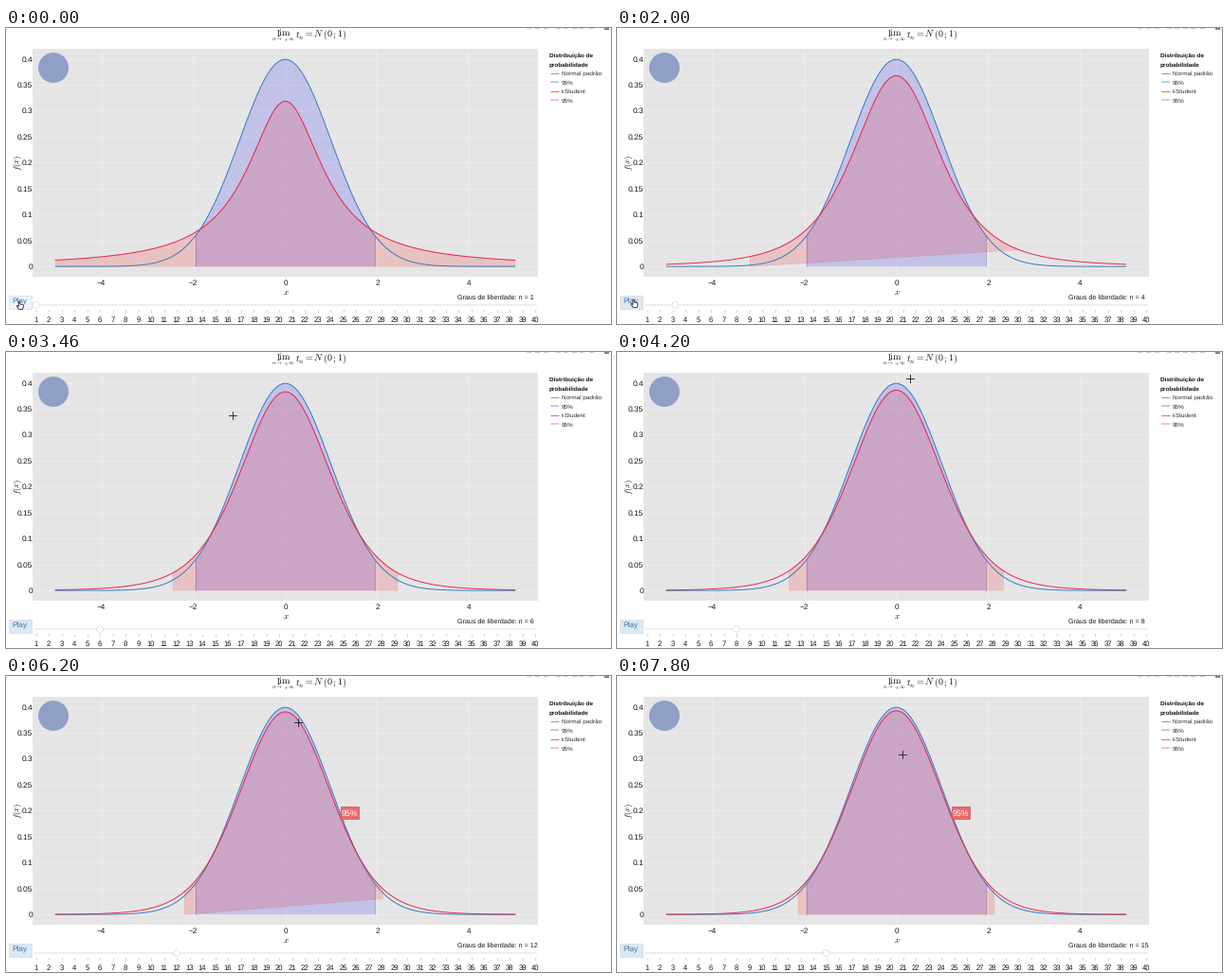
A matplotlib script that plays this animation: 638 px wide and 313 px high, repeating every 7860 ms.

```python
import math

import matplotlib.pyplot as plt
import numpy as np
from matplotlib.animation import FuncAnimation
from matplotlib.patches import Circle, Polygon, Rectangle

W, H, DPI = 638, 313, 100
LOOP, STEP_MS = 7860, 60
X0, Y0, SX, SY = 294.5, 252.2, 48.45, 549.0   # data origin and scale in pixels
FIRST, PERIOD = 432, 501                      # first animation step and its spacing
CURVE_MS, KNOB_MS = 500, 120
N_MAX = 15
BLUE, RED = "#3078bc", "#e6234f"
INK = "#111111"

plt.rcParams.update({"font.family": ["Liberation Sans", "DejaVu Sans"],
                     "mathtext.fontset": "cm", "text.hinting": "none"})


def px(x):
    return X0 + SX * np.asarray(x, float)


def py(y):
    return Y0 - SY * np.asarray(y, float)


def normal(x):
    return np.exp(-x * x / 2) / math.sqrt(2 * math.pi)


def student(x, n):
    c = math.gamma((n + 1) / 2) / (math.sqrt(n * math.pi) * math.gamma(n / 2))
    return c * (1 + x * x / n) ** (-(n + 1) / 2)


def bound(n):
    """Half width of the central 95 % area, limited to the drawn range."""
    x = np.linspace(0, 5, 10001)
    p = student(x, n)
    cdf = np.concatenate([[0], np.cumsum((p[1:] + p[:-1]) / 2) * (x[1] - x[0])])
    return float(np.interp(0.475, cdf, x))


def ease(p):
    p = min(max(p, 0), 1)
    return 4 * p ** 3 if p < 0.5 else 1 - 4 * (1 - p) ** 3


def mix(a, b, e):
    return a + (b - a) * e


fig = plt.figure(figsize=(W / DPI, H / DPI), dpi=DPI, facecolor="white")
ax = fig.add_axes([0, 0, 1, 1])
ax.set_xlim(0, W)
ax.set_ylim(H, 0)
ax.axis("off")


def pt(size):
    return size * 72 / DPI


def text(x, y, s, size, ha="center", color=INK, **kw):
    kw.setdefault("va", "center_baseline")
    return ax.text(x, y, s, fontsize=pt(size), ha=ha, color=color, **kw)


def line(xs, ys, color, width=1.0, **kw):
    return ax.plot(xs, ys, color=color, lw=pt(width), **kw)[0]


def box(x0, y0, x1, y1, face, edge="none", **kw):
    return ax.add_patch(Rectangle((x0, y0), x1 - x0, y1 - y0, fc=face, ec=edge,
                                  lw=pt(0.8), **kw))


# Plot panel, grid and axis labels
box(28, 22, 561, 263, "#e5e5e5", zorder=0)
for v in range(-4, 5, 2):
    line([px(v)] * 2, [22, 263], "#ececec", 1, zorder=1)
    text(px(v), 269, f"{v}".replace("-", "\u2212"), 8.1)
for k in range(9):
    v = k * 0.05
    line([28, 561], [py(v)] * 2, "#ececec", 1, zorder=1)
    text(28, py(v), f"{v:.2f}".rstrip("0").rstrip(".") if k else "0", 8.4, "right")
text(12.5, 142, "$f(x)$", 8.8, rotation=90, va="center")
text(295, 279.5, "$x$", 9)

# Title
text(292.5, 9, r"$\lim$", 10.2, va="baseline")
text(292.5, 13.6, r"$n\to+\infty$", 5.8, va="baseline")
text(305, 9, r"$t_n = N\,(0\,;1)$", 10, "left", va="baseline")

# Cropped toolbar and corner emblem
for x in (551, 560, 569, 582, 590, 599, 607, 617):
    line([x - 2, x + 2], [0.4, 0.4], "#ced2da", 1.2)
box(631, 0, 636, 1.5, "#7385ad")
ax.add_patch(Circle((50, 42), 16, fc="#8f9fc6", ec="none", zorder=2))

# Legend
text(573, 28.8, "Distribuição de", 6.4, "left", weight="bold")
text(573, 38.6, "probabilidade", 6.4, "left", weight="bold")
for k, (name, color) in enumerate([("Normal padrão", "#5b9bcb"), ("95%", "#c6c6f4"),
                                   ("t-Student", "#ea5576"), ("95%", "#f6c4c8")]):
    y = 47.8 + 9.55 * k
    line([573.5, 582.5], [y, y], color, 2 if k % 2 else 0.9, solid_capstyle="butt")
    text(585.5, y, name, 6.35, "left", color="#2a2a2a")

# Curves and areas
xs = np.linspace(-5, 5, 401)
inner = np.linspace(-1.96, 1.96, 161)
ax.fill(px(np.r_[-1.96, inner, 1.96]), py(np.r_[0, normal(inner), 0]),
        fc=(0, 0, 1, 0.15), ec="none", zorder=2)
for v in (-1.96, 1.96):
    line([px(v)] * 2, [py(0), py(normal(v))], "#5a5ac8", 0.8, alpha=0.4, zorder=3)
t_area = ax.add_patch(Polygon([[0, 0]], closed=True, fc=(1, 0, 0, 0.15),
                              ec=(0.9, 0.2, 0.2, 0.18), lw=pt(0.7), zorder=3))
line(px(xs), py(normal(xs)), BLUE, 0.95, zorder=4)
t_line = line(px(xs), py(student(xs, 1)), RED, 0.95, zorder=5)


# Slider
def tick_x(n):
    return 31.5 + 13.51 * (n - 1)


line([31, 559], [293, 293], "#ebeef3", 2)
for n in range(1, 41):
    line([tick_x(n)] * 2, [297.5, 300], "#b9c0ca", 0.7)
    text(tick_x(n), 308, str(n), 7.6)
knob = ax.add_patch(Circle((31.5, 293), 3.4, fc="white", ec="#dde2e9",
                           lw=pt(0.9), zorder=6))
caption = text(476, 284.3, "", 7.15, "left")

button = box(3, 282.5, 26.5, 296.5, "#eef3fa", "#d3dfea")
text(14.5, 288.6, "Play", 8.3, color="#3a78ac")

# Hover labels
tip = [
    ax.add_patch(Polygon([(306.1, 39.2), (309, 36.5), (309, 33), (381.5, 33),
                          (381.5, 45.5), (309, 45.5), (309, 42)],
                         fc="#1f77b4", ec="#e5e5e5", lw=pt(0.6), zorder=8)),
    text(345.3, 39.2, "(0.24, 0.3876166)", 9.5, color="white", zorder=9),
    text(384, 39.2, "Normal padrão", 9.1, "left", color=BLUE, zorder=9),
]
badge = [
    box(353, 137.5, 372, 151, "#ee6868", "#c66060", zorder=8),
    text(362.5, 144.6, "95%", 8.8, color="white", zorder=9),
]

# Pointers
cross = [line([], [], "#222222", 0.9, zorder=10) for _ in range(2)]
HAND = np.array([(0, 0), (1.2, 0), (1.4, 3), (4.6, 3.8), (5, 5), (4, 8.5),
                 (0.2, 8.5), (-2.2, 5), (-1.4, 4.4), (0, 5.5)])
hand = ax.add_patch(Polygon(HAND, fc="white", ec="#222222", lw=pt(0.8), zorder=10))
PATH = np.array([(0, 13.5, 289), (400, 13.5, 289), (2000, 17, 287), (2130, 18, 287),
                 (2690, 178.5, 101), (2740, 178.5, 101), (4200, 309, 28),
                 (4400, 309, 33), (5900, 309, 46), (6950, 305, 56), (7800, 301, 83)])

BOUNDS = {n: bound(n) for n in range(1, N_MAX + 1)}
EVEN = {1, 8, 15}   # steps whose outlines keep the same number of points


def area_points(a, b, e):
    """Outline between two areas; a dropped tail point leaves a slanted base."""
    qa, qb = BOUNDS[a], BOUNDS[b]
    end = qa if b in EVEN else qb - 0.1
    x = mix(np.linspace(-qa, end, 161), np.linspace(-qb, qb, 161), e)
    y = mix(student(x, a), student(x, b), e)
    base = 0 if b in EVEN else (1 - e) * student(end, a)
    return np.column_stack([px(np.r_[x[0], x, x[-1]]), py(np.r_[0, y, base])])


def draw(i):
    t = i * STEP_MS
    n = min(max(math.floor((t - FIRST) / PERIOD) + 1, 1), N_MAX)
    prev = max(n - 1, 1)
    since = t - FIRST - (n - 1) * PERIOD
    e = ease(since / CURVE_MS)

    t_line.set_ydata(py(mix(student(xs, prev), student(xs, n), e)))
    t_area.set_xy(area_points(prev, n, e))
    knob.center = (tick_x(mix(prev, n, ease(since / KNOB_MS))), 293)
    caption.set_text(f"Graus de liberdade: n = {n}")
    button.set_facecolor("#eef3fa" if t < 400 else "#dce8f2")

    show_tip, show_badge = 4400 <= t < 5900, t >= 6100
    for a in tip:
        a.set_visible(show_tip)
    for a in badge:
        a.set_visible(show_badge)

    x, y = (np.interp(t, PATH[:, 0], PATH[:, k]) for k in (1, 2))
    hand.set_visible(x < 26.5 and y > 283)
    hand.set_xy(HAND + (x, y))
    cross[0].set_data([x - 4, x + 4], [y, y])
    cross[1].set_data([x, x], [y - 4, y + 4])
    for a in cross:
        a.set_visible(28 < x < 561 and 22 < y < 263 and not show_tip)
    return [t_line, t_area, knob, caption, button, hand, *tip, *badge, *cross]


anim = FuncAnimation(fig, draw, frames=LOOP // STEP_MS, interval=STEP_MS,
                     init_func=lambda: draw(0), repeat=True, repeat_delay=0,
                     blit=False)
plt.show()
```
